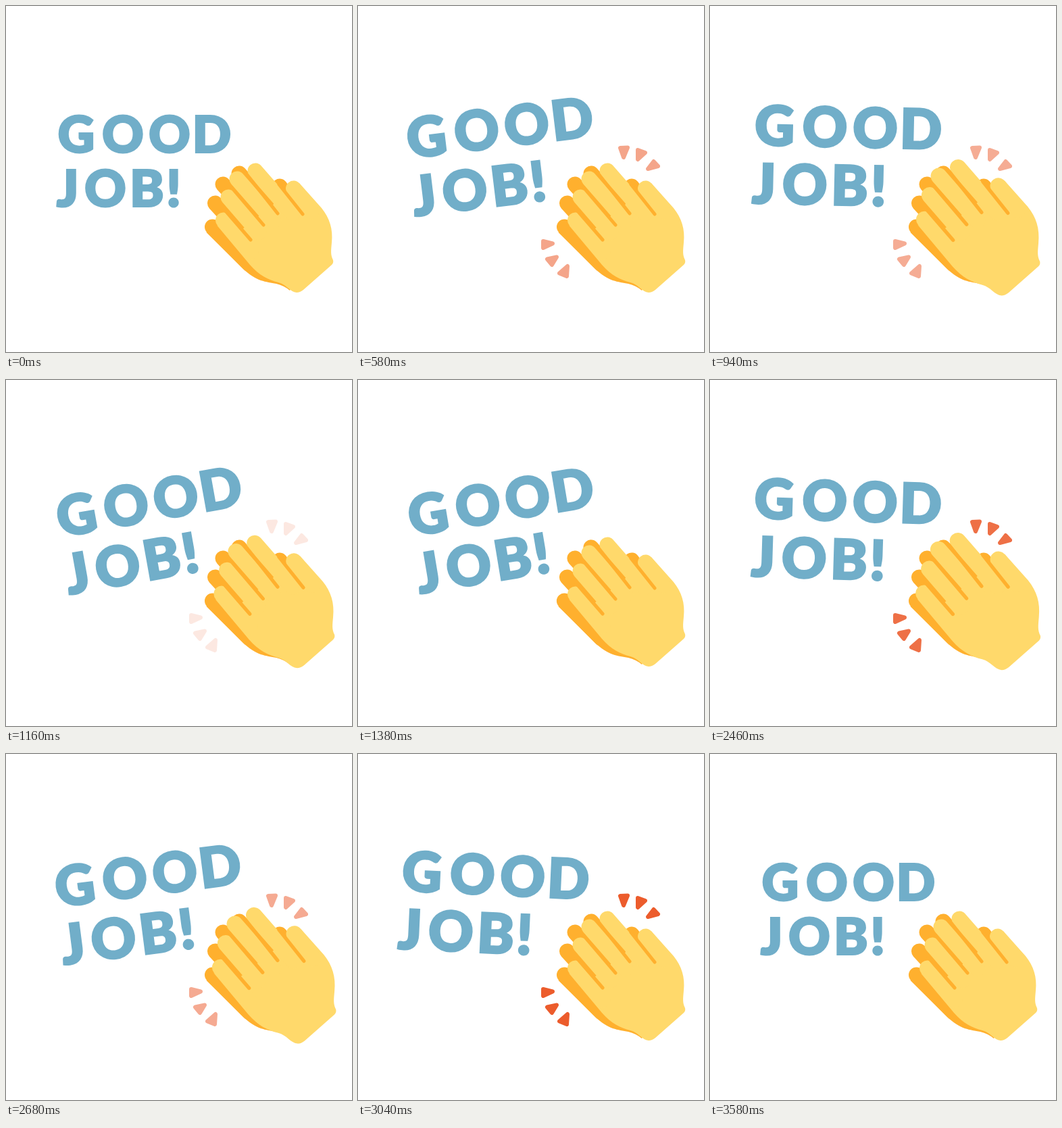
Recreate the animation shown at these times as an HTML page. Size 512 by 512 pixels, loop 3600 ms.

```html
<!DOCTYPE html>
<html lang="en">
<head>
<meta charset="utf-8">
<title>Good job!</title>
<style>
  html, body { margin: 0; width: 100%; height: 100%; overflow: hidden; background: #fff; }
  svg { display: block; width: 100vw; height: 100vh; }
  #words {
    font: 900 76px Lato, "Open Sans", sans-serif;
    text-anchor: middle;
    fill: #71aec9; stroke: #71aec9; stroke-width: 2;
  }
  .hand path { stroke-linecap: round; stroke-linejoin: round; }
  .hand .fingers { fill: none; stroke-width: 23; }
  #back { fill: #ffb02e; }
  #back .fingers { stroke: #ffb02e; }
  #front { fill: #ffd96b; }
  #front .fingers { stroke: #ffd96b; }
  #front .gaps { fill: none; stroke: #ffb02e; stroke-width: 5; }
  #sparks { fill: #ec5c2c; stroke: #ec5c2c; stroke-width: 6; stroke-linejoin: round; }
</style>
</head>
<body>
<svg viewBox="0 0 512 512">
  <g id="words">
    <text x="104 173 242 304.500" y="217">GOOD</text>
    <text x="91 147 208.500 248" y="296.500">JOB!</text>
  </g>
  <g id="back" class="hand">
    <path d="M296.500 335L350 388C370 408 385 408 400 411Q412 414 420 421L440 380L400 300L330 300Z"/>
    <path class="fingers" d="M345 248L385 293M321 264L365 312M309.500 292L350 336M305.500 327L360 382M405 267L425 295"/>
  </g>
  <g id="front" class="hand">
    <path d="M312.500 325L361 383C375 399 388 405 403 409C415 412 420 423 430 424Q435 424 440 420L482 383Q485 380 484 376C480 368 481 362 482 350C484 330 479 314 467 299L434 262L430 290L400 290L350 330Z"/>
    <path class="fingers" d="M369 244L424 307M342 256L396 318M329 283L374 335M321.500 317L362 364M425.500 270L452 304"/>
    <path class="gaps" d="M357 250L402 307M335 270L381 324M323 301L362 346M404 264L439 308"/>
  </g>
  <path id="sparks" d="M388 210L399 209.500L393 224ZM414 213L425 217L414 227ZM437.500 230L444 237L429 241Z
    M274 348L288 351.500L274 358ZM280 374.500L294 371.500L287 383ZM310 385L309 400L298 395.500Z"/>
</svg>
<script>
const LOOP = 3600, START = 300, STOP = 3300;
const SWING = 300;  // ms per swing of the words
const BEAT = 249;   // ms between claps

const $ = id => document.getElementById(id);
const words = $('words'), front = $('front'), back = $('back'), sparks = $('sparks');

const clamp = v => Math.min(1, Math.max(0, v));
const ramp = (t, from, to) => clamp((t - from) / (to - from));
const smooth = p => (1 - Math.cos(Math.PI * p)) / 2;
const turn = p => 2 * Math.PI * p;
const mix = (a, b, p) => a + (b - a) * p;

// The start times of n claps in a row
const claps = (first, n) => Array.from({ length: n }, (_, i) => first + i * BEAT);
const frontClaps = [...claps(383, 4), ...claps(2371, 3)];
const backClaps = claps(1379, 3);

const pulse = u => clamp(1 - Math.abs(u - 80) / 80);
const flash = u => ramp(u, 20, 100) * (1 - ramp(u, 180, 220));
const strongest = (starts, shape, t) => Math.max(...starts.map(s => shape(t - s)));

const zoom = (x, y, k) => `translate(${x} ${y}) scale(${k}) translate(${-x} ${-y})`;

// The words swing far to the left, and less to the right around mid-loop
function angle(t) {
  const right = 2.5 + 2.5 * Math.cos(turn((t - START) / (STOP - START)));
  const p = (1 + Math.sin(turn((t - START) / SWING))) / 2;
  const active = ramp(t, START, START + 80) * (1 - ramp(t, STOP - 80, STOP - 20));
  return mix(-12, right, p) * active;
}

function draw(t) {
  const grow = smooth(ramp(t, 285, 445)) * (1 - smooth(ramp(t, 3400, 3580)));
  words.setAttribute('transform',
    `rotate(${angle(t)} 209 145) ` +
    `translate(${mix(207.7, 208.4, grow)} ${mix(189.5, 179.5, grow)}) ` +
    `scale(${1 + 0.08 * grow}) translate(-207.7 -189.5)`);
  front.setAttribute('transform',
    zoom(405, 338, 1 + 0.07 * strongest(frontClaps, pulse, t)));
  back.setAttribute('transform',
    zoom(385, 338, 1 + 0.05 * strongest(backClaps, pulse, t)));
  sparks.setAttribute('opacity', strongest([...frontClaps, ...backClaps], flash, t));
}

const begin = performance.now();
function tick() {
  draw((performance.now() - begin) % LOOP);
  requestAnimationFrame(tick);
}
tick();
</script>
</body>
</html>
```
